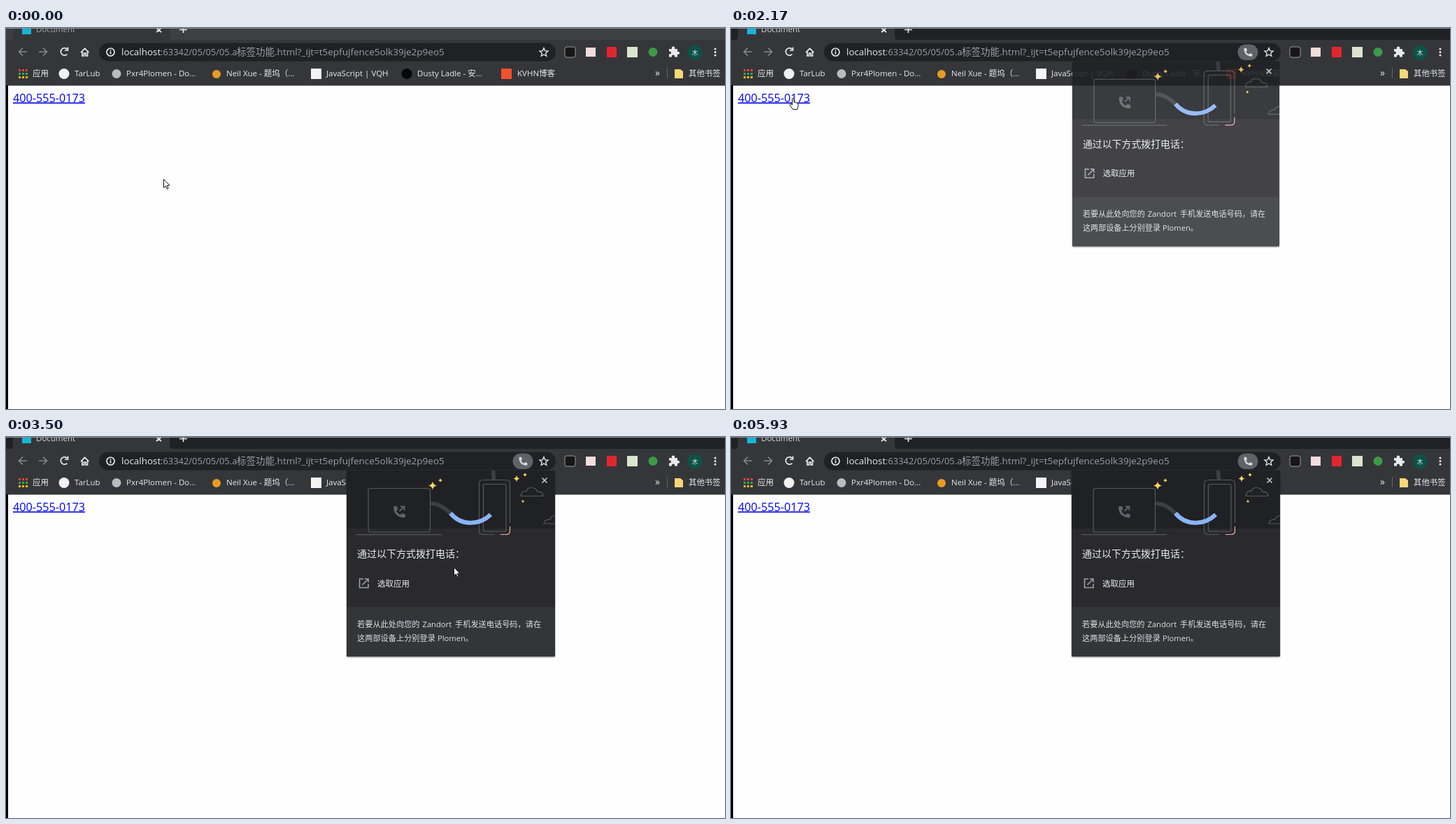
Recreate the animation shown at these times as an HTML page. Size 1028 by 545 pixels, loop 6800 ms.

```html
<!DOCTYPE html>
<html lang="zh-CN">
<head>
<meta charset="utf-8">
<style>
html, body { margin: 0; width: 100%; height: 100%; overflow: hidden; background: #fff; }
svg { display: block; width: 1028px; height: 545px; }
text { font: 11.5px "Open Sans", "Noto Sans CJK SC", "Noto Sans CJK", sans-serif; fill: #e8eaed; white-space: pre; }
.url { fill: #9aa0a6; }
.line { fill: none; stroke: #e8eaed; stroke-width: 1.7; }
.dim { stroke: #85888c; }
.art { fill: none; stroke: #55585c; stroke-width: 1.2; }
.note text { font-size: 11.2px; fill: #dfe1e5; }
</style>
</head>
<body>
<svg viewBox="0 0 1028 545">
  <defs>
    <path id="handset" d="M-5.6-7.5h3.2l1 4-2 2q1.8 3.3 5 5l2-2 4 1v3.2q0 1.3-1.3 1.3Q-6.8 6-6.8-6.3q0-1.2 1.2-1.2Z"/>
    <path id="spark" d="M0-6Q.8-.8 6 0 .8.8 0 6-.8.8-6 0-.8-.8 0-6Z"/>
    <path id="cloud" d="M1 12H33Q32 5 25 6 23 0 16 0 10 0 9 5 2 4 1 12Z"/>
    <filter id="shadow" x="-5%" y="-5%" width="110%" height="112%">
      <feDropShadow dx="0" dy="1" stdDeviation="1.3" flood-opacity=".5"/>
    </filter>
  </defs>

  <!-- tab strip -->
  <rect id="strip" width="1028" height="18"/>
  <path d="M3 18Q10 18 10 10V0H234V10Q234 18 241 18Z" fill="#35363a"/>
  <rect x="23" y="0" width="13" height="9" fill="#16b5d8"/>
  <text id="tabTitle" x="43" y="6">Document</text>
  <path class="line" d="M215 0l7 6m0-6l-7 6M248 2.5h11M253.500 0v7" stroke-width="1.5"/>
  <rect width="1028" height="1" fill="#85898d"/>

  <!-- toolbar -->
  <rect y="17" width="1028" height="66" fill="#35363a"/>
  <path class="line dim" d="M30 34H18.500m5.500-5.500L18.500 34l5.500 5.500M47 34h11.500M53 28.500l5.500 5.500-5.500 5.500"/>
  <path class="line" d="M87.500 37.500a5.300 5.300 0 1 1 0-7.200M88.500 27.500v4.500h-4.500"/>
  <path class="line" d="M107 35l5.700-5.700 5.700 5.700M109 34v6h2.500v-4h2.500v4h2.500v-6"/>
  <rect x="133" y="21.500" width="653" height="26" rx="13" fill="#202124"/>
  <circle class="line" cx="149.500" cy="34.500" r="5.500" stroke-width="1.300"/>
  <path class="line" d="M149.500 33.500v4M149.500 31v1.500"/>
  <text x="165" y="39" style="font-size:13.4px">localhost</text>
  <text class="url" x="221" y="39" style="font-size:12.9px">:63342/05/05/05.a</text>
  <text class="url" x="330" y="39" style="font-size:13.5px">标签功能.html?_ijt=t5epfujfence5olk39je2p9eo5</text>
  <g id="pill">
    <rect x="724.500" y="23.500" width="29" height="22.500" rx="11.200" fill="#5f6368"/>
    <use href="#handset" transform="translate(739 35) scale(.82)" fill="#dadce0"/>
  </g>
  <path class="line" stroke-width="1.300" d="M769 28.500l1.700 4.100 4.400.4-3.400 2.900 1.100 4.300-3.800-2.300-3.800 2.300 1.100-4.300-3.400-2.900 4.400-.4Z" style="stroke-width:1.3"/>
  <rect x="799" y="27" width="15" height="15" rx="3" fill="#171717" stroke="#9b9b9b"/>
  <rect x="829" y="28" width="14" height="13" fill="#f3dcdc"/>
  <rect x="859" y="27" width="14" height="15" fill="#e3262e"/>
  <rect x="888" y="27" width="15" height="15" fill="#dbe5cd"/>
  <circle cx="925" cy="34.500" r="6.500" fill="#3c9b49"/>
  <path d="M948 30h4q-1-3.500 2-3.500t2 3.500h4v4q3-1 3 1.800t-3 1.700v4h-4q.5-3-2-3t-2 3h-4v-4q3 0 3-2.200t-3-1.800Z" fill="#e8eaed"/>
  <circle cx="985" cy="35" r="10.500" fill="#0b5349"/>
  <text x="980.500" y="38.500" style="font-size:9px">木</text>
  <g fill="#e8eaed"><circle cx="1014" cy="30" r="1.500"/><circle cx="1014" cy="34.500" r="1.500"/><circle cx="1014" cy="39" r="1.500"/></g>

  <!-- bookmarks -->
  <g stroke-width="3" stroke-dasharray="3 2" fill="none">
    <path d="M18 60.500h13" stroke="#ea4335"/>
    <path d="M18 65.500h13" stroke="#34a853"/>
    <path d="M18 70.500h13" stroke="#fbbc05"/>
  </g>
  <text x="38" y="69">应用</text>
  <circle cx="83" cy="65.500" r="7.500" fill="#f1f1f1"/>
  <text x="98" y="69">TarLub</text>
  <circle cx="158" cy="65.500" r="6.500" fill="#b9bcbf"/>
  <text x="172" y="69">Pxr4Plomen - Do...</text>
  <circle cx="301" cy="66" r="6" fill="#e79b24"/>
  <text x="315" y="69">Neil Xue - 题坞（...</text>
  <rect x="436" y="58" width="15" height="15" fill="#f4f4f4"/>
  <text x="458" y="69">JavaScript | VQH</text>
  <circle cx="573" cy="65.500" r="7.500" fill="#080808"/>
  <text x="588" y="69">Dusty Ladle - 安...</text>
  <rect x="708" y="58" width="15" height="15" fill="#f4502f"/>
  <text x="731" y="69">KVHN博客</text>
  <text x="928" y="69" style="font-size:14px">»</text>
  <path d="M945.500 57v15" stroke="#5f6368"/>
  <path d="M956 59h8l4 3v10h-12Z" fill="#f6d776"/>
  <text x="976" y="69" style="font-size:11.4px">其他书签</text>

  <!-- page -->
  <rect y="82.500" width="1028" height="463" fill="#fefefe"/>
  <rect y="82" width="3" height="463" fill="#000"/>
  <text id="link" x="10" y="105.500" style="font-size:16.2px;text-decoration:underline">400-555-0173</text>

  <!-- call bubble -->
  <g id="bubble">
    <g filter="url(#shadow)">
      <rect x="487" y="48" width="298" height="266" rx="2" fill="#292a2d"/>
    </g>
    <rect x="487" y="48" width="298" height="83" fill="#202124"/>
    <rect x="487" y="243" width="298" height="71" rx="1" fill="#323639"/>
    <rect id="row" x="487" y="184.500" width="298" height="50" fill="#434447"/>
    <g class="art">
      <rect x="518" y="73.500" width="88.500" height="62.500" rx="3.500"/>
      <path d="M501 139.700H623"/>
      <path d="M607 95Q622 95 636 110M697 48Q696 54 698 61" stroke="#3c4043" stroke-width="5.500"/>
      <path d="M698 139.500H682Q676.500 139.500 676.500 134V67Q676.500 61.500 682 61.500H715Q720.500 61.500 720.500 67V123"/>
      <rect x="682.500" y="67.500" width="32.500" height="67.500" rx="2.500"/>
      <path d="M635.500 109C650 127 676 127 693 111" stroke="#8ab4f8" stroke-width="6"/>
      <path d="M707 139.500H715Q720.500 139.500 720.500 134V128" stroke="#f6aea9"/>
      <use href="#cloud" x="735" y="72.500"/>
      <path d="M785 112.500Q779 113 778 118 770 117 769 124H785"/>
    </g>
    <g fill="#fdd663">
      <use href="#spark" transform="translate(610 69.500)"/>
      <use href="#spark" transform="translate(621 62) scale(.5)"/>
      <use href="#spark" transform="translate(730 59.500) scale(.8)"/>
      <use href="#spark" transform="translate(742 54) scale(.5)"/>
      <use href="#spark" transform="translate(739 92) scale(.4)"/>
    </g>
    <g fill="#5f6368" stroke="#5f6368">
      <use href="#handset" transform="translate(562 107.500) scale(1.15)" stroke="none"/>
      <path d="M562.500 106l6-6M564 99.500h5.500v5.500" fill="none" stroke-width="1.800"/>
    </g>
    <path class="line" d="M766.500 58.500l7 7m0-7l-7 7" style="stroke:#bdc1c6"/>
    <text x="502" y="172" style="font-size:14px">通过以下方式拨打电话：</text>
    <path class="line" d="M511 203h-5.500v12.500h12.500v-5.500M513 203h5v5M518 203l-8.500 8.500" style="stroke:#9aa0a6;stroke-width:1.6"/>
    <text x="531" y="213.500">选取应用</text>
    <g class="note">
      <text x="502" y="272">若要从此处向您的</text>
      <text x="595.500" y="272">Zandort</text>
      <text x="642" y="272">手机发送电话号码，请在</text>
      <text x="502" y="292">这两部设备上分别登录</text>
      <text x="617" y="292">Plomen。</text>
    </g>
  </g>

  <g id="pointer" fill="#fff" stroke="#111" stroke-linejoin="round">
    <path id="arrow" d="M.5.500V12.500L3.300 9.900 5.200 14.300 7.100 13.500 5.200 9.200H9Z"/>
    <path id="hand" d="M4.500 10V1.800Q4.500.5 5.700.5T7 1.800V6Q9 5 9.500 6.800 11 6 11.500 7.500 13 7 13 9V12Q13 14 11.500 16.500H5.500Q4.500 14.500 1.500 11 .5 9.500 1.800 8.800 3 8.500 4.500 10Z"/>
  </g>
</svg>
<script>
const LOOP = 6800;
const el = id => document.getElementById(id);
const show = (id, on) => el(id).setAttribute("opacity", +on);

// pointer path: time, x, y
const path = [
  [0, 225, 216], [120, 217, 208], [240, 204, 195], [360, 195, 187],
  [640, 189, 183], [760, 179, 176], [880, 171, 172], [1030, 160, 172],
  [1180, 151, 175], [1330, 134, 156], [1450, 110, 128], [1570, 93, 109],
  [1720, 83, 100], [2570, 252, 164], [2720, 552, 167], [2870, 550, 190],
  [2990, 541, 194], [3110, 537, 172], [3260, 590, 128], [3380, 652, 156],
  [3500, 640, 186], [3650, 611, 204], [3800, 581, 204], [3950, 558, 203],
  [4100, 553, 203], [4250, 552, 204], [4400, 550, 206], [5270, 555, 222],
  [5390, 578, 290], [5510, 611, 364], [5660, 760, 470], [5810, 927, 513]
];

function draw(t) {
  const within = (a, b) => t >= a && t < b;
  const active = t >= 1870;
  const [, x, y] = path.findLast(p => p[0] <= t);

  el("strip").setAttribute("fill", active ? "#202124" : "#3c4043");
  el("tabTitle").style.fill = active ? "#dadce0" : "#a4a8ac";
  el("link").style.fill = within(1870, 2020) ? "#f00" : "#00e";

  show("pill", t < 2020 ? 0 : t < 2170 ? 0.5 : 1);
  show("bubble", t < 2170 ? 0 : t < 2320 ? 0.88 : 1);
  const s = t < 2320 ? 0.993 : 1;
  el("bubble").setAttribute("transform", `translate(636 48) scale(${s}) translate(-636 -48)`);
  show("row", within(2870, 3110) || within(3650, 5390));

  const linkHover = within(1720, 2570);
  el("pointer").setAttribute("transform", `translate(${x} ${y})`);
  show("pointer", t < 5930);
  show("hand", linkHover);
  show("arrow", !linkHover);
}

const start = performance.now();
function tick() {
  draw((performance.now() - start) % LOOP);
  requestAnimationFrame(tick);
}
tick();
</script>
</body>
</html>
```
